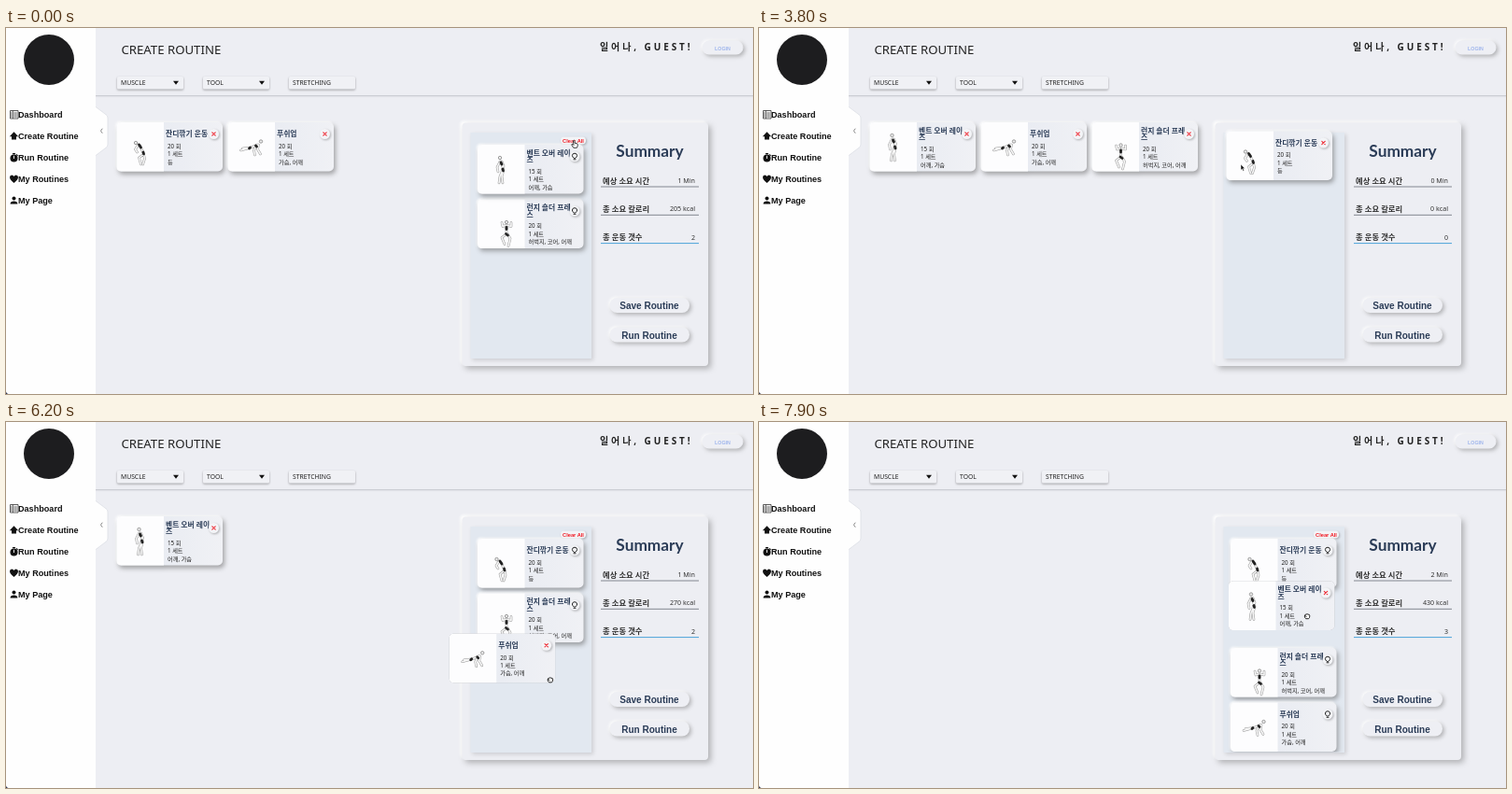
Animation of 800 by 392 pixels, one loop 8000 ms. Source, as an HTML page:

```html
<!DOCTYPE html>
<html lang="ko">
<head>
<meta charset="utf-8">
<title>Create Routine</title>
<style>
  html, body { margin: 0; width: 100%; height: 100%; overflow: hidden; background: #edeef3; }
  svg { display: block; width: 800px; height: 392px; }
  text { font-family: "Noto Sans", "Noto Sans CJK KR", sans-serif; fill: #222; white-space: pre; }
  .arial { font-family: "Liberation Sans", Arial, sans-serif; font-weight: 700; }
  .navy { fill: #2b3c57; }
  .menu { font-size: 9.1px; fill: #111; }
  .field { font-size: 6.8px; }
  .label { font-size: 8.3px; font-weight: 600; fill: #333; }
  .value { font-size: 7.1px; font-weight: 500; fill: #333; text-anchor: end; }
  .title { font-size: 7.8px; font-weight: 600; fill: #2b3c57; }
  .meta { font-size: 6.2px; font-weight: 500; fill: #222; }
  .mid { text-anchor: middle; }
  .box { fill: #f0f1f5; filter: drop-shadow(.5px 1px 1px #0005); }
  .pill { fill: #eeeff4; filter: drop-shadow(2px 2px 2px #0004) drop-shadow(-1px -1px 1.5px #fff); }
  .board { fill: #edeef3; filter: drop-shadow(3px 3px 3px #0004) drop-shadow(-1.5px -1.5px 1.5px #fff); }
  .well { fill: #e2e8f0; filter: drop-shadow(2px 2px 2px #0002); }
  .lift { filter: drop-shadow(2px 3px 2.5px #0005) drop-shadow(-1px -1px 1px #fff); }
  .flat { filter: drop-shadow(0 0 .6px #0004); }
  .dot { fill: #f3f4f7; filter: drop-shadow(1px 1px 1.2px #0004); }
  .line { fill: none; stroke-linecap: round; stroke-linejoin: round; }
</style>
</head>
<body>
<svg id="stage" viewBox="0 0 800 392">
  <defs>
    <linearGradient id="face"><stop stop-color="#e4e8f0"/><stop offset="1" stop-color="#f0f1f5"/></linearGradient>
    <clipPath id="inside"><rect x="497.500" y="112" width="129.500" height="241.500"/></clipPath>
  </defs>
  <rect width="800" height="392" fill="#edeef3"/>
  <path d="M96 72.500H800" stroke="#cbcdd3" stroke-width="1.200"/>
  <path d="M96 73.700H800" stroke="#e0e1e7"/>
  <rect width="96" height="392" fill="#fefefe"/>
  <path d="M95.500 84L108 93.500Q109 94.500 109 97V124Q109 126.500 108 127.500L95.500 137Z" fill="#fefefe"/>
  <path d="M96 84.400L108 93.500Q109 94.500 109 97V124Q109 126.500 108 127.500L96 136.600" fill="none" stroke="#d9dbe2" stroke-width=".7"/>
  <path class="line" d="M103 108l-1.500 2.200 1.500 2.200" stroke="#555" stroke-width=".7"/>
  <path d="M0 389.500Q.3 391.700 2.500 392H0Z" fill="#1c2340"/>
  <circle cx="46" cy="34" r="27" fill="#1d1d1f"/>

  <g fill="#111">
    <path d="M4.500 88.500h8.500v8.500h-8.500zM7.300 88.500v8.500M8.300 91h3.500M8.300 93h3.500M8.300 95h3.500M5 91h1.500M5 93h1.500M5 95h1.500" fill="none" stroke="#333" stroke-width=".8"/>
    <path d="M8.500 111.300L13.200 116.300H11V119.600H6V116.300H3.800Z"/>
    <circle cx="8.500" cy="139.500" r="4"/><path d="M7 134h3v1.300H7zM11.500 135l1.500 1.500-.8.800-1.500-1.500z"/>
    <path d="M8.500 136.800V140" stroke="#fff" stroke-width=".9"/>
    <path d="M8.500 166Q4 162.500 4 160Q4 157.600 6.200 157.500Q7.800 157.500 8.500 159Q9.200 157.500 10.800 157.500Q13 157.600 13 160Q13 162.500 8.500 166Z"/>
    <circle cx="8.500" cy="182.500" r="2"/><path d="M4.600 188.500Q4.600 185.500 8.500 185.500Q12.400 185.500 12.400 188.500Z"/>
  </g>
  <g id="menu"></g>

  <text x="123.500" y="27.800" font-size="13.200" font-weight="500">CREATE ROUTINE</text>
  <text x="636" y="24" font-size="10" font-weight="600" letter-spacing="2.900">일어나, GUEST!</text>
  <rect class="pill" x="745.500" y="13.500" width="44" height="15" rx="7.500"/>
  <text class="arial mid" x="767.500" y="23.800" font-size="5.300" style="fill:#9db4ec">LOGIN</text>
  <g id="fields"></g>

  <rect class="board" x="488.500" y="101.500" width="263.500" height="260.500" rx="4"/>
  <rect class="well" x="497.500" y="112" width="129.500" height="242"/>
  <text class="mid navy" x="689.500" y="138.300" style="font:700 17.300px Lato, sans-serif">Summary</text>
  <g id="stats"></g>
  <rect class="pill" x="646.500" y="289" width="85.500" height="16" rx="8"/>
  <text class="arial mid navy" x="689" y="301.300" font-size="10">Save Routine</text>
  <rect class="pill" x="646.500" y="320.500" width="85.500" height="16" rx="8"/>
  <text class="arial mid navy" x="689" y="332.800" font-size="10">Run Routine</text>
  <g id="clear">
    <rect class="dot" x="594" y="116.500" width="27" height="8" rx="4"/>
    <text class="arial mid" x="607.500" y="122.700" font-size="5.700" style="fill:#f0141e">Clear All</text>
  </g>
  <g id="routine" clip-path="url(#inside)"></g>
  <g id="deck"></g>
  <g id="cursor" stroke="#fff" stroke-width=".5">
    <path id="arrow" d="M0 0V6.200L1.400 5 2.500 7.300 3.500 6.800 2.500 4.600H4.400Z" fill="#111"/>
    <path id="hand" class="line" d="M-1.300-3.500Q-.5-4.300 0-3.300V-.8Q3.300-.8 3.300 1Q3.300 3 2.300 4.300H-1.200L-3.300 1Q-3.200 0-2 .5L-1.300 1.200Z" stroke="#111" stroke-width=".8" style="fill:#fff"/>
    <path id="fist" class="line" d="M-2.600-.5Q-2.400-2.300-1-1.900Q0-2.800 1-1.900Q2.800-2.200 2.800-.3Q2.800 1.800 1.600 2.700H-1.300Q-3.300 1-2.600-.5L-.8.300" stroke="#111" stroke-width=".9" style="fill:#fff"/>
  </g>
</svg>
<script>
const LOOP = 8000, STEP = 100;
const $ = id => document.getElementById(id);

function add(parent, tag, attrs = {}, content = '') {
  const node = document.createElementNS('http://www.w3.org/2000/svg', tag);
  for (const key in attrs) node.setAttribute(key, attrs[key]);
  node.textContent = content;
  return parent.appendChild(node);
}
const label = (parent, cls, x, y, content) => add(parent, 'text', { class: cls, x, y }, content);
const show = (node, on) => { node.style.display = on ? '' : 'none'; };

['Dashboard', 'Create Routine', 'Run Routine', 'My Routines', 'My Page'].forEach((name, i) =>
  label($('menu'), 'arial menu', 13, 95.800 + i * 23, name));

['MUSCLE', 'TOOL', 'STRETCHING'].forEach((name, i) => {
  const x = 119 + i * 92;
  add($('fields'), 'rect', { class: 'box', x, y: 52, width: 71, height: 13.500, rx: 1.500 });
  label($('fields'), 'field', x + 4, 61.300, name);
  if (i < 2) add($('fields'), 'path', { d: `M${x + 60} 56.800h6l-3 4z`, fill: '#111' });
});

const values = ['예상 소요 시간', '총 소요 칼로리', '총 운동 갯수'].map((name, i) => {
  const y = 166 + i * 30.300;
  label($('stats'), 'label', 639, y + .5, name);
  add($('stats'), 'path', { d: `M637 ${y + 4}H742`, stroke: i < 2 ? '#777b85' : '#3b9ad6', 'stroke-width': .9 });
  return label($('stats'), 'value', 738, y, '');
});

const totals = [
  [0, '1 Min', '205 kcal', '2'],
  [1300, '0 Min', '0 kcal', '0'],
  [3900, '1 Min', '110 kcal', '1'],
  [5000, '1 Min', '270 kcal', '2'],
  [6500, '2 Min', '430 kcal', '3']
];

// Slots of the card grid and of the routine list
const grid = n => [118.500 + n % 3 * 119, 101 + Math.floor(n / 3) * 58.500];
const list = n => [505, 125 + n * 58.500];

// track: [time, x, y]; equal times make a jump. listed / drag: [from, to] spans
const cards = [
  {
    title: ['잔디깎기 운동'], meta: ['20 회', '1 세트', '등'],
    limbs: 'M25 25L29 34 24 38 26 45M29 34L30 39 28 45M23 24L20 29 22 32', dark: 'M24 24L26 27M28.500 32L29 34', head: [20.500, 22],
    track: [[0, ...grid(0)], [1300, ...grid(0)], [1300, ...grid(1)], [2900, ...grid(1)], [3200, 320, 106],
      [3500, 440, 112], [3700, 500.500, 110.500], [3800, 500.500, 110.500], [3900, ...list(0)]],
    listed: [[3900, LOOP]], drag: [2900, 3700]
  },
  {
    title: ['런지 숄더 프레', '스'], meta: ['20 회', '1 세트', '허벅지, 코어, 어깨'],
    limbs: 'M31 29V37L26 41 29 48M32 37L35 42 33 50M30 28L27 29 26 25M32 28L36 29 36 25', dark: 'M31 30V32M30.500 37L32.500 38.500', head: [31, 24.500],
    track: [[0, ...list(1)], [1300, ...list(1)], [1300, ...grid(3)], [3000, ...grid(3)], [3200, ...grid(2)],
      [4250, ...grid(2)], [4500, 451, 179.500], [4800, 503, 185], [5000, ...list(1)], [7100, ...list(1)], [7300, ...list(2)]],
    listed: [[0, 1300], [5000, LOOP]], drag: [4250, 5000]
  },
  {
    title: ['푸쉬업'], meta: ['20 회', '1 세트', '가슴, 어깨'],
    limbs: 'M32 24L25 27 14 30M25 27L16 28M33 24L32 29 35 34M31 24L28 30 29 35', dark: 'M30 25L31 26M24 27L23 28', head: [35.500, 20.500],
    track: [[0, ...grid(1)], [1300, ...grid(1)], [1300, ...grid(2)], [3000, ...grid(2)], [3200, ...grid(1)],
      [5350, ...grid(1)], [5600, 323, 159.500], [6300, 500, 238], [6500, ...list(2)], [7100, ...list(2)], [7300, ...list(3)]],
    listed: [[6500, LOOP]], drag: [5350, 6500]
  },
  {
    title: ['벤트 오버 레이', '즈'], meta: ['15 회', '1 세트', '어깨, 가슴'],
    limbs: 'M25 18L28 27 26 34 27 41M27 27L24 34 23 41M24 18L21 24 22 29M26 18L28 23 26 28', dark: 'M25 19L26 21M27 26L27.500 28', head: [24, 14],
    track: [[0, ...list(0)], [1300, ...list(0)], [1300, ...grid(0)], [6750, ...grid(0)], [6900, 277, 148.500],
      [7300, 490, 167], [7900, 503, 170.500]],
    listed: [[0, 1300]], drag: [6750, LOOP]
  }
];

const pointer = [
  [0, 609, 124], [1300, 609, 124], [1300, 613, 121], [1800, 613, 121], [2100, 529, 150], [2300, 420, 112], [2600, 246, 138],
  [2900, 246, 138], [3700, 516, 146], [3900, 516, 146], [4200, 431, 139], [4500, 526, 217], [4900, 580, 222],
  [5000, 580, 222], [5350, 346, 147], [5600, 432, 217], [6300, 608, 286], [6500, 606, 284], [6750, 227, 144],
  [6900, 385, 193], [7300, 576, 204], [7900, 587, 208]
];

function buildCard(card) {
  const g = card.node = add($('deck'), 'g');
  add(g, 'rect', { width: 113.500, height: 52.500, rx: 5, fill: 'url(#face)' });
  add(g, 'path', { d: 'M50.500 0V52.500H5Q0 52.500 0 47.500V5Q0 0 5 0Z', fill: '#fdfdfe' });
  const stroke = (d, color, width) => add(g, 'path', { class: 'line', d, stroke: color, 'stroke-width': width });
  stroke(card.limbs, '#999', 2.600);
  stroke(card.limbs, '#f6f6f6', 1.600);
  stroke(card.dark, '#222', 2.800);
  const [cx, cy] = card.head;
  add(g, 'circle', { cx, cy, r: 1.700, fill: '#eee', stroke: '#777', 'stroke-width': .7 });

  const wrapped = card.title.length > 1;
  card.title.forEach((row, i) => label(g, 'title', 52.500, (wrapped ? 11.800 : 15) + i * 7.600, row));
  card.meta.forEach((row, i) => label(g, 'meta', 54.500, (wrapped ? 30.800 : 27.800) + i * 8.400, row));

  add(g, 'circle', { class: 'dot', cx: 104, cy: 12.500, r: 5.500 });
  card.cross = stroke('M102.300 10.800l3.400 3.400m0-3.400l-3.400 3.400', '#ef2b34', 1.100);
  card.bulb = stroke('M103 14.300Q101.300 12.800 101.400 11.500Q101.700 9.200 104 9.200Q106.300 9.200 106.600 11.500Q106.700 12.800 105 14.300ZM103 15.800h2', '#222', 1);
}
cards.forEach(buildCard);

function sample(track, t) {
  let i = track.length - 1;
  while (track[i][0] > t) i--;
  const [t0, x0, y0] = track[i];
  if (i === track.length - 1) return [x0, y0];
  const [t1, x1, y1] = track[i + 1];
  const k = (t - t0) / (t1 - t0);
  return [x0 + (x1 - x0) * k, y0 + (y1 - y0) * k];
}
const within = (t, [from, to]) => t >= from && t < to;
const place = (node, [x, y]) => node.setAttribute('transform', `translate(${x} ${y})`);

function draw(t) {
  let anyListed = false, grabbing = false;
  for (const card of cards) {
    const listed = card.listed.some(span => within(t, span));
    const dragged = within(t, card.drag);
    const home = $(listed ? 'routine' : 'deck');
    anyListed ||= listed;
    grabbing ||= dragged && t >= 4250;
    place(card.node, sample(card.track, t));
    card.node.setAttribute('class', dragged ? 'flat' : 'lift');
    show(card.bulb, listed);
    show(card.cross, !listed);
    if (card.node.parentNode !== home || dragged) home.append(card.node);
  }
  const row = totals.findLast(entry => entry[0] <= t);
  values.forEach((node, i) => { node.textContent = row[i + 1]; });
  show($('clear'), anyListed);
  place($('cursor'), sample(pointer, t));
  show($('hand'), t < 1300);
  show($('fist'), grabbing);
  show($('arrow'), t >= 1300 && !grabbing);
}

let shown = -1;
function tick() {
  const t = Math.floor(performance.now() % LOOP / STEP) * STEP;
  if (t !== shown) draw(shown = t);
  requestAnimationFrame(tick);
}
tick();
</script>
</body>
</html>
```
